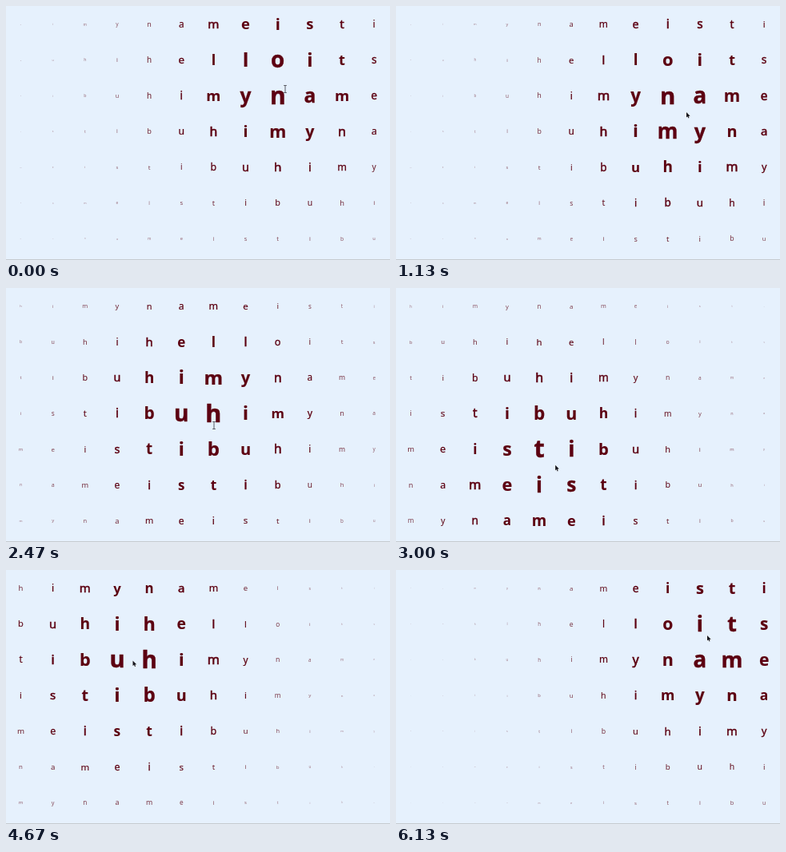
An HTML page with a canvas for the animation above (6190 ms loop, 480 by 318 pixels).

```html
<!DOCTYPE html>
<html lang="en">
<head>
<meta charset="utf-8">
<title>Letters growing near the pointer</title>
<style>
  html, body { margin: 0; width: 100%; height: 100%; overflow: hidden; background: #e6f1fd; }
  canvas { display: block; width: 480px; height: 318px; }
</style>
</head>
<body>
<canvas id="stage" width="480" height="318"></canvas>
<script>
const ctx = document.getElementById('stage').getContext('2d');
const LOOP = 6190, COLS = 12, INK = '#5c0011';
const name = 'tibu';
const greeting = 'himynameis' + name;
const letters = greeting + 'hihelloits' + name + greeting.repeat(4);

// Turning points of the swelling: time, x, y, pointer's diagonal lead
const path = [
  [0, 340, 95, 9], [500, 410, 85, 9], [1130, 355, 125, 8],
  [1850, 285, 170, 10], [2470, 245, 157, 15], [2850, 215, 232, 10],
  [3600, 80, 93, 8], [4070, 68, 212, 4], [4670, 160, 115, -1.5],
  [5600, 208, 172, 16], [5850, 320, 195, 9], [6130, 399, 92, -10]
];

const clamp = (v, lo, hi) => Math.min(hi, Math.max(lo, v));

// Smooth curve through the turning points
function poseAt(t) {
  let i = 0;
  while (i < path.length - 2 && t >= path[i + 1][0]) i++;
  const a = path[i], b = path[i + 1];
  const before = path[Math.max(0, i - 1)];
  const after = path[Math.min(path.length - 1, i + 2)];
  const span = b[0] - a[0];
  const u = clamp((t - a[0]) / span, 0, 1), u2 = u * u, u3 = u2 * u;
  return [1, 2, 3].map(k => {
    const va = (b[k] - before[k]) / (b[0] - before[0]) * span;
    const vb = (after[k] - a[k]) / (after[0] - a[0]) * span;
    return (2 * u3 - 3 * u2 + 1) * a[k] + (u3 - 2 * u2 + u) * va
      + (3 * u2 - 2 * u3) * b[k] + (u3 - u2) * vb;
  });
}

// Fifteen pictures per second, on a 10 ms grid
function snap(t) {
  const rest = t % 200;
  return t - rest + (rest < 70 ? 0 : rest < 130 ? 70 : 130);
}

function drawArrow(x, y) {
  ctx.beginPath();
  [[0, 0], [0, 6.6], [1.5, 5.3], [2.5, 7.6], [3.6, 7.1], [2.6, 4.9], [4.7, 4.8]]
    .forEach(([dx, dy]) => ctx.lineTo(x + dx, y + dy));
  ctx.closePath();
  ctx.lineWidth = 1;
  ctx.strokeStyle = '#f7faff';
  ctx.stroke();
  ctx.fillStyle = '#15151c';
  ctx.fill();
}

function drawBeam(x, y) {
  ctx.beginPath();
  ctx.moveTo(x, y - 4);
  ctx.lineTo(x, y + 4);
  for (const end of [-4.5, 4.5]) {
    ctx.moveTo(x - 1.8, y + end);
    ctx.lineTo(x + 1.8, y + end);
  }
  ctx.lineWidth = 0.9;
  ctx.strokeStyle = '#4a4a52';
  ctx.stroke();
}

// Size, weight and strength all fall with distance d; returns the text box
function drawLetter(letter, x, y, d) {
  const size = Math.max(0.3, 35 * Math.exp(-d / 140) - 1);
  const bold = d < 95;
  ctx.font = `${bold ? 700 : 400} ${size.toFixed(2)}px "Noto Sans", "Open Sans", sans-serif`;
  ctx.globalAlpha = clamp(0.2 + size / 15, 0, 1);
  const base = y + size * 0.345;
  ctx.fillText(letter, x, base);
  // A thin outline stands in for the weights between regular and bold
  const extra = bold ? 0.02 * (1 - d / 95) : 0.042 * (1 - (d - 95) / 75);
  if (extra > 0) {
    ctx.lineWidth = size * extra;
    ctx.strokeText(letter, x, base);
  }
  return { halfWidth: ctx.measureText(letter).width / 2, halfHeight: size * 0.68 };
}

function draw(t) {
  const [fx, fy, lead] = poseAt(t);
  const px = fx + lead, py = fy + lead;
  let overText = false;

  ctx.globalAlpha = 1;
  ctx.fillStyle = '#e6f1fd';
  ctx.fillRect(0, 0, 480, 318);
  ctx.fillStyle = '#c6cacf';
  ctx.fillRect(0, 317, 480, 1);

  ctx.fillStyle = ctx.strokeStyle = INK;
  ctx.textAlign = 'center';
  ctx.lineJoin = 'miter';
  ctx.miterLimit = 3;
  [...letters].forEach((letter, i) => {
    const x = 18.5 + 40.15 * (i % COLS);
    const y = 22.9 + 44.75 * Math.floor(i / COLS);
    const box = drawLetter(letter, x, y, Math.hypot(x - fx, y - fy));
    if (Math.abs(px - x) < box.halfWidth && Math.abs(py - y) < box.halfHeight) overText = true;
  });

  ctx.globalAlpha = 1;
  (overText ? drawBeam : drawArrow)(px, py);
}

const start = performance.now();
function tick() {
  draw(snap((performance.now() - start) % LOOP));
  requestAnimationFrame(tick);
}
tick();
</script>
</body>
</html>
```
